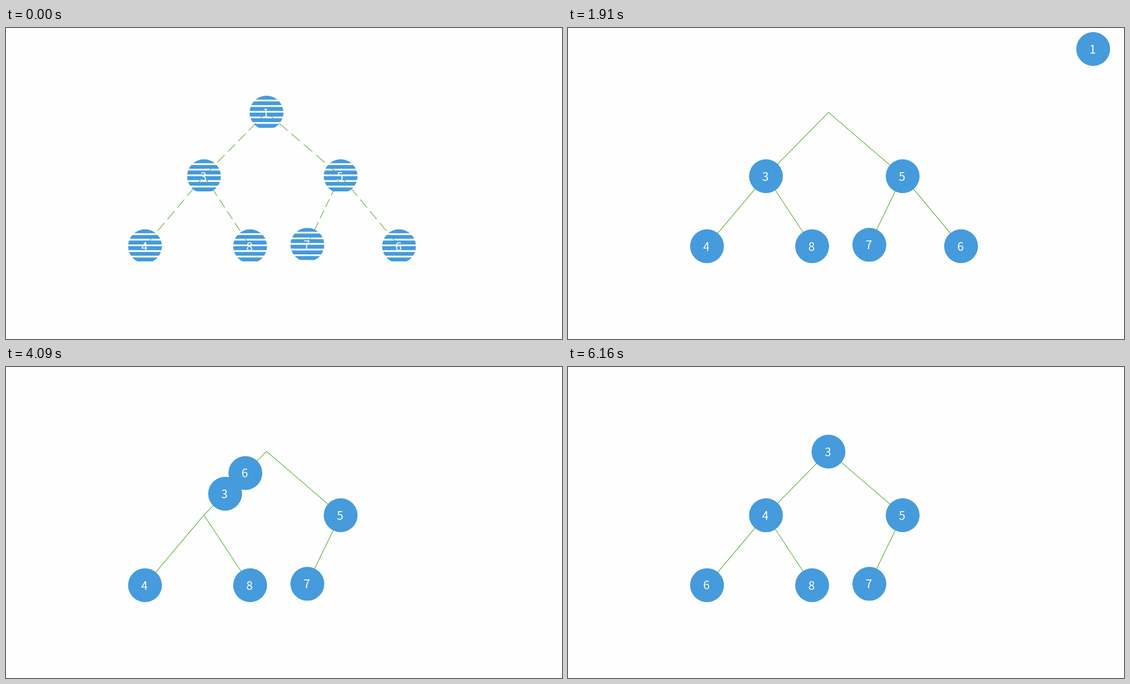
Write an HTML page with a canvas that moves like this. It is 952x533 px and loops after 6.77 s.

```html
<!DOCTYPE html>
<html lang="en">
<head>
<meta charset="utf-8">
<title>Heap removal</title>
<style>
  html, body { margin: 0; width: 100%; height: 100%; overflow: hidden; background: #fefefe; }
  canvas { display: block; }
</style>
</head>
<body>
<canvas id="stage" width="952" height="533"></canvas>
<script>
const ctx = document.getElementById('stage').getContext('2d');
const LOOP = 6770;
const RADIUS = 29;
const BLUE = '#459bdb';
const GREEN = '#56b035';

const ROOT = [446, 145], LEFT = [339, 254], RIGHT = [573, 254];
const LL = [238, 374], LR = [418, 374], RL = [516, 371.6], RR = [673, 374];
const EDGES = [[ROOT, LEFT], [ROOT, RIGHT], [LEFT, LL], [LEFT, LR], [RIGHT, RL]];
const LAST_EDGE = [RIGHT, RR];

// The removed root travels up, then right; every leg takes equal time.
const EXIT_PATH = [ROOT, [446, 36], [458, 36], [492, 36], [704, 36], [774, 36], [927, 36]];
const EXIT = { start: 157, length: 2000 };
const RAISE = { start: 2157, length: 1000 };
const PULSE = { start: 3170, length: 500 };
const SWAP_A = { start: 3680, length: 1000 };
const FADE = { start: 4700, length: 490 };
const SWAP_B = { start: 5205, length: 975 };

const clamp = v => Math.min(1, Math.max(0, v));
const progress = (t, span) => clamp((t - span.start) / span.length);
const smooth = u => u < 0.5 ? 2 * u * u : 1 - 2 * (1 - u) ** 2;
const mix = (a, b, k) => [a[0] + (b[0] - a[0]) * k, a[1] + (b[1] - a[1]) * k];
const triangle = u => 1 - Math.abs(2 * u - 1);

function travel(t, stops) {
  let pos = stops[0];
  for (let i = 1; i < stops.length; i += 2) {
    const u = progress(t, stops[i]);
    if (u > 0) pos = mix(pos, stops[i + 1], smooth(u));
  }
  return pos;
}

function exitPosition(t) {
  const legs = EXIT_PATH.length - 1;
  const p = smooth(progress(t, EXIT)) * legs;
  const i = Math.min(legs - 1, Math.floor(p));
  return mix(EXIT_PATH[i], EXIT_PATH[i + 1], p - i);
}

// Reveals a shape through six horizontal slats.
function withBlinds(top, height, open, draw) {
  ctx.save();
  if (open < 1) {
    const slat = height / 6;
    ctx.beginPath();
    for (let i = 0; i < 6; i++) ctx.rect(0, top + i * slat, 952, slat * open);
    ctx.clip();
  }
  draw();
  ctx.restore();
}

function drawEdge([a, b], open) {
  withBlinds(a[1], b[1] - a[1], open, () => {
    ctx.strokeStyle = GREEN;
    ctx.lineWidth = 1.1;
    ctx.beginPath();
    ctx.moveTo(a[0], a[1] - 0.3);
    ctx.lineTo(b[0], b[1] - 0.3);
    ctx.stroke();
  });
}

function drawNode(label, [x, y], open, { scale = 1, alpha = 1 } = {}) {
  withBlinds(y - RADIUS, RADIUS * 2, open, () => {
    ctx.translate(x, y);
    ctx.scale(scale, scale);
    ctx.globalAlpha = alpha;
    ctx.fillStyle = BLUE;
    ctx.beginPath();
    ctx.arc(0, 0, RADIUS, 0, Math.PI * 2);
    ctx.fill();
    ctx.globalAlpha = 1;
    ctx.fillStyle = '#fff';
    ctx.fillText(label, -1, 7.5);
  });
}

function pulseLook(t) {
  const u = progress(t, PULSE);
  const dip = Math.min(1, u / 0.2, (1 - u) / 0.2);
  return { scale: 1 + 0.05 * triangle(u), alpha: 1 - 0.5 * dip };
}

function render(t) {
  const open = clamp((t + 343) / 500);
  const pulse = pulseLook(t);
  const fade = { alpha: 1 - 0.5 * triangle(progress(t, FADE)) };

  ctx.fillStyle = '#fefefe';
  ctx.fillRect(0, 0, 952, 533);
  ctx.font = '300 20px "Noto Sans CJK SC", "Noto Sans CJK JP", "Noto Sans CJK", sans-serif';
  ctx.textAlign = 'center';

  EDGES.forEach(edge => drawEdge(edge, open));
  if (t < RAISE.start) {
    drawEdge(LAST_EDGE, open);
    drawNode('1', exitPosition(t), open);
  }

  drawNode('5', RIGHT, open);
  drawNode('8', LR, open);
  drawNode('7', RL, open);
  drawNode('4', travel(t, [LL, SWAP_B, LEFT]), open, fade);
  drawNode('6', travel(t, [RR, RAISE, ROOT, SWAP_A, LEFT, SWAP_B, LL]), open,
    t < SWAP_A.start ? pulse : fade);
  drawNode('3', travel(t, [LEFT, SWAP_A, ROOT]), open, pulse);
}

const began = performance.now();
function tick() {
  render((performance.now() - began) % LOOP);
  requestAnimationFrame(tick);
}
tick();
</script>
</body>
</html>
```
